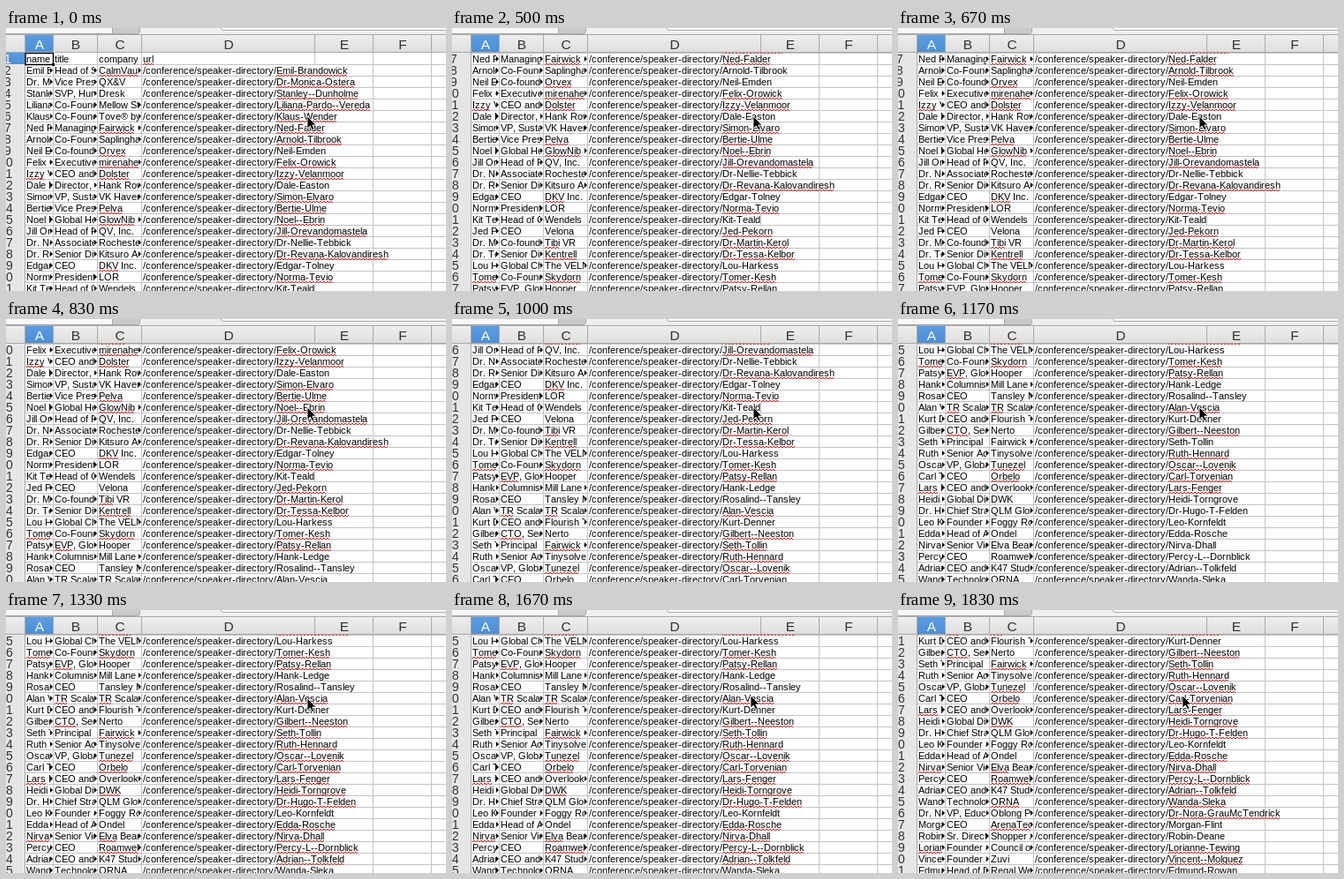
An HTML page for the animation above (1.99 s loop, 498 px wide and 298 px high).

```html
<!DOCTYPE html>
<html lang="en">
<head>
<meta charset="utf-8">
<title>Speaker sheet</title>
<style>
html, body { margin: 0; width: 100%; height: 100%; overflow: hidden; background: #fff; }
svg { display: block; }
#stage { width: 498px; height: 298px; }
text { font-family: "Liberation Sans", Arial, sans-serif; white-space: pre; }
.cell { font-size: 11px; fill: #000; }
.num { font-size: 14px; fill: #333; text-anchor: middle; }
.col { font-size: 15.500px; fill: #333; text-anchor: middle; }
.on { fill: #fff; }
.grid { stroke: #c4c4c4; fill: none; }
.edge { stroke: #a9a9a7; fill: none; }
.wave { stroke: #d82c2c; fill: none; }
#rows, #cursor, .late, .slow { animation: 1990ms step-end infinite; }
#rows { animation-name: scroll; }
#cursor { animation-name: point; }
.late { animation-name: late; }
.slow { animation-name: slow; }
/* 13px per row; wheel steps of three rows */
@keyframes scroll {
  0% { transform: translateY(0); }
  25.126% { transform: translateY(-78px); }
  41.709% { transform: translateY(-117px); }
  50.251% { transform: translateY(-195px); }
  58.794% { transform: translateY(-312px); }
  91.960% { transform: translateY(-390px); }
}
@keyframes point {
  0% { transform: translate(341px, 100px); }
  83.920% { transform: translate(338px, 97px); }
  91.960% { transform: translate(322px, 97px); }
}
@keyframes late {
  0% { opacity: 1; }
  58.794% { opacity: 0; }
  66.834% { opacity: 1; }
}
@keyframes slow {
  0% { opacity: 1; }
  25.126% { opacity: 0; }
  33.668% { opacity: 1; }
}
</style>
</head>
<body>
<svg id="stage" viewBox="0 0 498 298">
  <defs>
    <linearGradient id="head" x2="0" y2="1"><stop stop-color="#eeeeec"/><stop offset="1" stop-color="#dededc"/></linearGradient>
    <linearGradient id="pick" x2="0" y2="1"><stop stop-color="#5c9be0"/><stop offset="1" stop-color="#4a90d9"/></linearGradient>
    <clipPath id="body"><path d="M0 28H498V298H0Z"/></clipPath>
  </defs>
  <rect width="498" height="298" fill="#fff"/>
  <g clip-path="url(#body)"><g id="rows"></g></g>
  <g id="top">
    <rect width="498" height="8" fill="#f0efee"/>
    <path d="M0 0H120V5.500H0Z" fill="#f8f8f7"/>
    <path d="M121 0H151V4Q151 6 149 6H121Z" fill="#cbcac8"/>
    <path class="edge" d="M0 6.500H149Q151.500 6.500 151.500 4V0M120.500 0V6"/>
    <path d="M243.500 0Q243.500 2.500 246 2.500H498V0Z" fill="#fff"/>
    <path class="edge" d="M243.500 0Q243.500 2.500 246 2.500H498"/>
    <rect y="8" width="498" height="20" fill="url(#head)"/>
    <path class="edge" d="M0 7.500H498M0 27.500H498"/>
  </g>
  <g id="cursor"><path d="M0 0V14L3.200 11L5.600 15.600L8 14.500L5.700 10H10Z" fill="#000" stroke="#fff" stroke-width=".8"/></g>
</svg>
<script>
// title | company | page name | wavy marks: a = name, b = title, c = company, d = page, l = marked late, s = marked slowly
const people = `Head of Sound|CalmVault Group|Emil-Brandowick|cd
Vice President|QX&V|Dr-Monica-Ostera|d
SVP, Human Care|Dresk|Stanley--Dunholme|d
Co-Founder|Mellow Studios|Liliana-Pardo--Vereda|d
Co-Founder|Tove® by Ansel|Klaus-Wender|d
Managing Director|Fairwick Consulting|Ned-Falder|cd
Co-Founder|Saplinghand Media|Arnold-Tilbrook|ds
Co-founder|Orvex|Neil-Emden|c
Executive Director|mirenahealing|Felix-Orowick|cd
CEO and Founder|Dolster|Izzy-Velanmoor|acd
Director, Data|Hank Rowe & Co|Dale-Easton|
VP, Sustainability|VK Haven West|Simon-Elvaro|d
Vice President|Pelva|Bertie-Ulme|cd
Global Head|GlowNib Labs|Noel--Ebrin|cd
Head of Product|QV, Inc.|Jill-Orevandomastela|d
Associate Professor|Rochester Institute|Dr-Nellie-Tebbick|
Senior Director|Kitsuro America|Dr-Revana-Kalovandiresh|d
CEO|DKV Inc.|Edgar-Tolney|c
President and CEO|LOR|Norma-Tevio|d
Head of Care|Wendels|Kit-Teald|
CEO|Velona|Jed-Pekorn|d
Co-founder|Tibi VR|Dr-Martin-Kerol|cd
Senior Director|Kentrell|Dr-Tessa-Kelbor|cd
Global Chief|The VELN Agency|Lou-Harkess|
Co-Founder|Skydorn|Tomer-Kesh|acd
EVP, Global Sales|Hooper|Patsy-Rellan|bd
Columnist, Tech|Mill Lane Gazette|Hank-Ledge|
CEO|Tansley Media|Rosalind--Tansley|
TR Scalar Partner|TR Scalar Group|Alan-Vescia|bcd
CEO and Founder|Flourish Table|Kurt-Denner|
CTO, Security|Nerto|Gilbert--Neeston|bd
Principal|Fairwick Consulting|Seth-Tollin|cdl
Senior Accessibility|Tinysolve|Ruth-Hennard|d
VP, Global Sales|Tunezel|Oscar--Lovenik|cd
CEO|Orbelo|Carl-Torvenian|cd
CEO and Founder|Overlook Build|Lars-Fenger|ad
Global Director|DWK|Heidi-Torngrove|cdl
Chief Strategist|QLM Global|Dr-Hugo-T-Felden|dl
Founder and CEO|Foggy Robots|Leo-Kornfeldt|
Head of AI|Ondel|Edda-Rosche|dl
Senior Vice President|Elva Beauty|Nirva-Dhall|acdl
CEO|Roamwell Media|Percy-L--Dornblick|cdl
CEO and Founder|K47 Studios|Adrian--Tolkfeld|dl
Technology Editor|ORNA|Wanda-Sleka|cd
VP, Education|Oblong Pandas|Dr-Nora-GrauMcTendrick|d
CEO|ArenaTechs Hub|Morgan-Flint|c
Sr. Director|Shopper Alliance|Robin-Deane|
Founder and CEO|Council of Digital|Lorianne-Tewing|ad
Founder and CEO|Zuvi|Vincent--Molquez|d
Head of Design|Regal Wendels|Edmund-Rowan|`.split("\n").map(s => s.split("|"));

const path = "/conference/speaker-directory/";
const cols = [21, 53, 103, 153, 349, 415, 481, 547];
const rowH = 13;

function add(parent, tag, attrs, text) {
  const el = document.createElementNS("http://www.w3.org/2000/svg", tag);
  for (const k in attrs) el.setAttribute(k, attrs[k]);
  if (text !== undefined) el.textContent = text;
  return parent.appendChild(el);
}

// Whole-pixel glyph advances at 11px
const pen = document.createElement("canvas").getContext("2d");
pen.font = '2048px "Liberation Sans", Arial, sans-serif';
const widths = {};
const advance = ch => widths[ch] ??= Math.round(pen.measureText(ch).width * 11 / 2048);
const width = s => [...s].reduce((w, ch) => w + advance(ch), 0);

function wave(parent, x, w, cls) {
  let d = `M${x} 14`;
  for (let i = 2; i <= w; i += 2) d += `l2 ${i % 4 ? -2 : 2}`;
  add(parent, "path", { class: "wave " + cls, d });
}

function cell(row, col, text, mark, cls) {
  const x = cols[col] + 2, room = cols[col + 1] - cols[col] - 1;
  const over = col < 3 && width(text) > room - 1;
  const box = col < 3
    ? add(row, "svg", { x: 0, y: 0, width: cols[col + 1] - (over ? 3 : 0), height: 16 })
    : row;
  let at = x;
  const xs = [...text].map(ch => (at += advance(ch)) - advance(ch));
  add(box, "text", { class: "cell", x: xs.join(" "), y: 11 }, text);
  if (mark) wave(box, x + width(text.slice(0, text.indexOf(mark))), width(mark), cls);
  if (over) add(row, "path", { d: `M${cols[col + 1] - 3} 4v6l3 -3z` });
}

const rows = document.getElementById("rows");
const first = s => s.split(/[ ,]/)[0];

[["title", "company", "url", "d"], ...people].forEach(([title, company, page, marks], i) => {
  const row = add(rows, "g", { transform: `translate(0 ${28 + i * rowH})` });
  const name = i ? page.replace(/^Dr-/, "Dr. ").replace(/-+/g, " ") : "name";
  const url = i ? path + page : page;
  const wide = 155 + width(url) > cols[4];
  const cls = marks.includes("l") ? "late" : marks.includes("s") ? "slow" : "";

  add(row, "rect", { width: 21, height: rowH, fill: i ? "#e6e6e4" : "url(#pick)" });
  add(row, "path", { class: "edge", d: "M0 13.500H21.500V0" });
  const lines = cols.slice(1, 7).filter(x => !(wide && x === cols[4]));
  add(row, "path", { class: "grid", d: "M22 13.500H498" + lines.map(x => `M${x + .5} 0V13`).join("") });
  add(row, "text", { class: i ? "num" : "num on", x: i < 9 ? 2 : 0, y: 12 }, i + 1);

  [name, title, company].forEach((text, col) =>
    cell(row, col, text, marks.includes("abc"[col]) && first(text), cls));
  cell(row, 3, url, marks.includes("d") && page, cls);
});

// Selected cell
add(rows, "path", { d: "M22 28.500H53.500V41.500H22Z", fill: "none", stroke: "#000", "stroke-width": 1.4 });
add(rows, "rect", { x: 52, y: 40, width: 3, height: 3 });

const header = document.getElementById("top");
[..."ABCDEF"].forEach((letter, i) => {
  const x = cols[i], mid = (x + cols[i + 1]) / 2 + 1;
  if (!i) add(header, "rect", { x: 22, y: 8, width: 31, height: 19, fill: "url(#pick)" });
  add(header, "text", { class: i ? "col" : "col on", x: mid, y: 24 }, letter);
});
add(header, "path", { class: "edge", d: cols.map(x => `M${x + .5} 8V28`).join("") });
</script>
</body>
</html>
```
